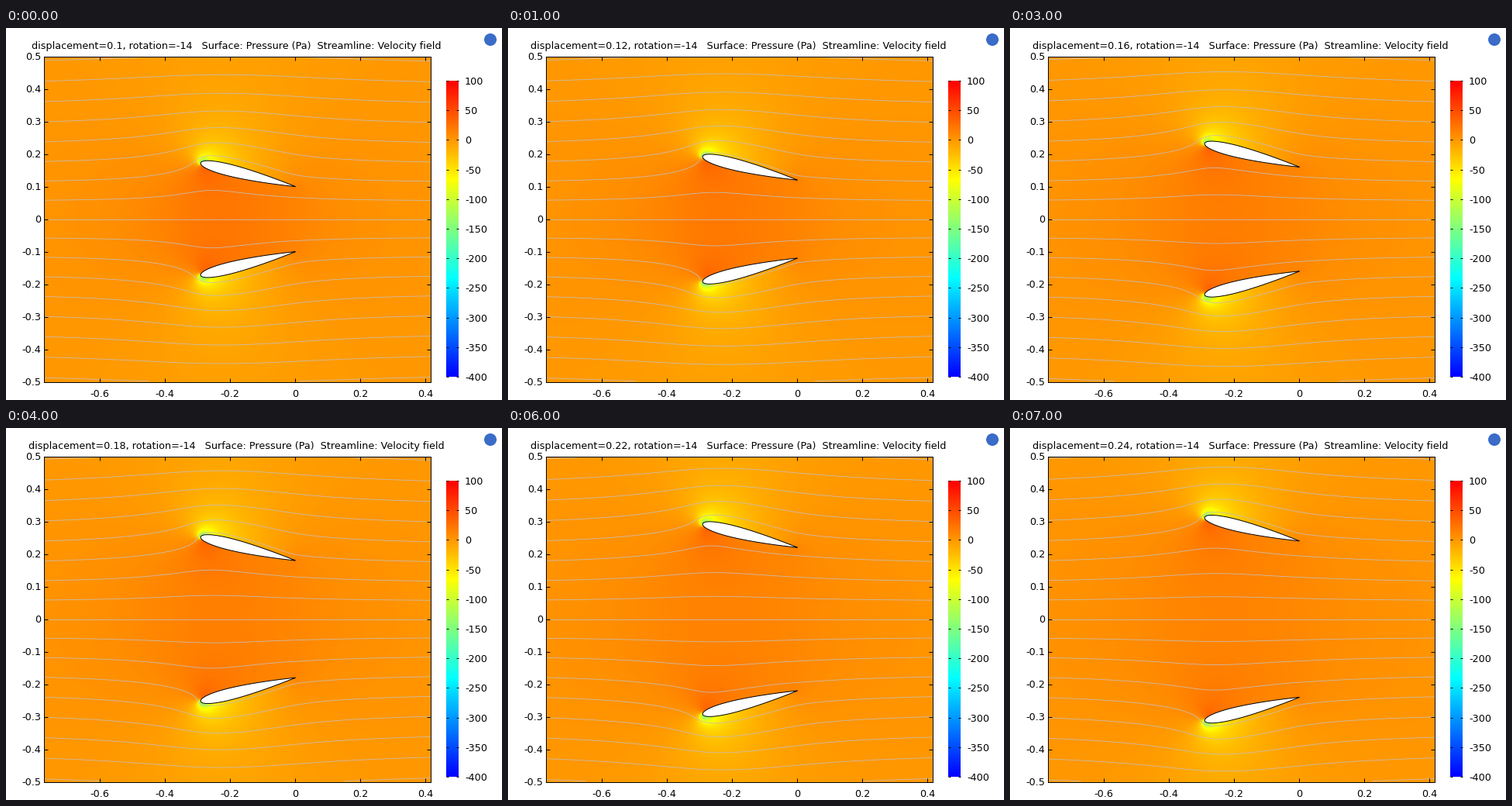
A matplotlib script for the animation above (8000 ms loop, 640x480 px).

```python
import numpy as np
import matplotlib.pyplot as plt
from matplotlib.animation import ArtistAnimation
from matplotlib.colors import LinearSegmentedColormap
from matplotlib.patches import Circle
from matplotlib.path import Path

W, H, DPI = 640, 480, 80
PX = 72 / DPI                      # one pixel in points
HAIR = 0.98 * PX                   # just under a pixel, snaps to one row
SCALE = 420                        # pixels per unit length
LEFT, TOP, RIGHT, BOTTOM = 49.4, 36.6, 548.4, 456.6
X0, Y0 = 373.4, 246.6              # pixel position of the plot's zero
XLIM = ((LEFT - X0) / SCALE, (RIGHT - X0) / SCALE)
YLIM = (-0.5, 0.5)

CHORD, ANGLE = 0.3, np.radians(14)
DYNAMIC_P = 34                     # free stream dynamic pressure, Pa
P_MIN, P_MAX = -400, 100
BAR_TOP, BAR_HEIGHT = 68, 382
DISPLACEMENTS = np.arange(0.10, 0.25, 0.02)

plt.rcParams["font.family"] = "DejaVu Sans"
plt.rcParams["font.size"] = 12.7 * PX
rainbow = LinearSegmentedColormap.from_list(
    "rainbow_bar", [(0, 0, 1), (0, 1, 1), (1, 1, 0), (1, 0, 0)], 1024)


# ---- potential flow around the mirrored pair of foils ----

def foil(d, n=32):
    """Closed symmetric foil, trailing edge at (0, d), nose turned up."""
    s = (1 + np.cos(np.linspace(0, np.pi, n + 1))) / 2
    t = 0.6 * (0.2969 * np.sqrt(s) - 0.126 * s - 0.3516 * s**2
               + 0.2843 * s**3 - 0.1036 * s**4)
    t[0] = 0
    shape = np.concatenate([s - 1 + 1j * t, (s - 1 - 1j * t)[-2::-1]])
    return 1j * d + CHORD * shape * np.exp(-1j * ANGLE)


def panel(z, a, b):
    """Stream function and velocity of a unit vortex sheet from a to b."""
    size = np.abs(b - a)
    tangent = (b - a) / size
    local = (z - a) / tangent
    x, y = local.real, local.imag
    x2 = x - size
    log1 = np.log(x * x + y * y + 1e-14)
    log2 = np.log(x2 * x2 + y * y + 1e-14)
    turn = np.arctan2(y * size, x * x2 + y * y)
    psi = -(x * log1 - x2 * log2 - 2 * size + 2 * y * turn) / (4 * np.pi)
    vel = tangent * (-2 * turn + 1j * (log1 - log2)) / (4 * np.pi)
    return psi, vel


def sheet_strengths(pts, body_psi):
    """Sheets for a given body stream value, and for smooth flow off the tail."""
    a, b = pts[:-1], pts[1:]
    mid = ((a + b) / 2)[:, None]
    A = panel(mid, a, b)[0] - panel(mid.conj(), a, b)[0]
    y = mid.imag[:, 0]
    n = len(y)
    fixed = np.linalg.solve(A, body_psi - y)
    M = np.zeros((n + 1, n + 1))
    M[:n, :n] = A
    M[:n, n] = -1
    M[n, 0] = M[n, n - 1] = 1
    smooth = np.linalg.solve(M, np.append(-y, 0))[:n]
    return fixed, smooth


def fill_hole(p, hole):
    """Carry outside values a few cells into the body."""
    for _ in range(3):
        known = (~hole).astype(float)
        total, count = 0, 0
        for step, axis in ((1, 0), (-1, 0), (1, 1), (-1, 1)):
            total = total + np.roll(known * p, step, axis)
            count = count + np.roll(known, step, axis)
        edge = hole & (count > 0)
        p[edge] = total[edge] / count[edge]
        hole = hole & ~edge
    return p


NX, NY = 300, 252
gx = XLIM[0] + (np.arange(NX) + 0.5) * (XLIM[1] - XLIM[0]) / NX
gy = YLIM[0] + (np.arange(NY) + 0.5) / NY
GX, GY = np.meshgrid(gx, gy)
GRID = GX + 1j * GY


def flow(d):
    pts = foil(d)
    fixed, smooth = sheet_strengths(pts, 0.907 * d - 0.0057)
    psi, vel = np.zeros(GRID.shape), np.zeros(GRID.shape, complex)
    for a, b, g, k in zip(pts[:-1], pts[1:], fixed, smooth):
        dpsi, dvel = panel(GRID, a, b)
        psi += g * dpsi
        vel += k * dvel
    psi = GY + psi - psi[::-1]
    vel = 1 + vel + vel[::-1].conj()
    p = np.maximum(DYNAMIC_P * (1 - np.abs(vel)**2), -125)
    outline = Path(np.column_stack([pts.real, pts.imag]))
    cells = np.column_stack([GX.ravel(), GY.ravel()])
    hole = outline.contains_points(cells).reshape(GRID.shape)
    return pts, psi, fill_hole(p, hole | hole[::-1])


# ---- fixed parts of the picture ----

fig = plt.figure(figsize=(W / DPI, H / DPI), dpi=DPI, facecolor="white")


def pixel_axes(x0, y0, x1, y1):
    return fig.add_axes([x0 / W, 1 - y1 / H, (x1 - x0) / W, (y1 - y0) / H])


def put(x, y, s, ha="center"):
    return fig.text(x / W, 1 - y / H, s, ha=ha, va="baseline", color="black")


ax = pixel_axes(LEFT, TOP, RIGHT, BOTTOM)
ax.set(xlim=XLIM, ylim=YLIM)
xticks = np.arange(-3, 3) / 5
yticks = np.arange(-5, 6) / 10
ax.set_xticks(xticks, [""] * len(xticks))
ax.set_yticks(yticks, [""] * len(yticks))
ax.tick_params(direction="in", length=5 * PX, width=HAIR, top=True, right=True)
for side in ax.spines.values():
    side.set_linewidth(HAIR)
for v in xticks:
    put(X0 + v * SCALE - 0.5, 475.5, f"{v:g}")
for v in yticks:
    put(45, Y0 - v * SCALE + 4.4, f"{v:g}", "right")

bar = pixel_axes(568, BAR_TOP, 584, BAR_TOP + BAR_HEIGHT)
bar.imshow(np.linspace(0, 1, 512)[:, None], cmap=rainbow, origin="lower",
           aspect="auto", extent=(0, 1, P_MIN, P_MAX))
pticks = np.arange(P_MIN, P_MAX + 1, 50)
bar.set_xticks([])
bar.set_yticks(pticks, [""] * len(pticks))
bar.tick_params(direction="in", length=3 * PX, width=HAIR, right=True)
for side in bar.spines.values():
    side.set_visible(False)
for v in pticks:
    y = BAR_TOP + (P_MAX - v) * BAR_HEIGHT / (P_MAX - P_MIN)
    put(592, y + 5, f"{v}", "left")

fig.add_artist(Circle((625, H - 15), 8, transform=None, color="#3a6cc8", lw=0))


# ---- one set of artists per displacement ----

k = np.arange(-8, 9)
LEVELS = 0.0552 * k + 0.00053 * k * np.abs(k)


def scene(d):
    pts, psi, p = flow(d)
    field = ax.imshow(p, cmap=rainbow, vmin=P_MIN, vmax=P_MAX, origin="lower",
                      extent=(*XLIM, *YLIM), aspect="auto",
                      interpolation="bilinear", zorder=0)
    lines = ax.contour(gx, gy, psi, levels=LEVELS, colors="#c8beb4",
                       linewidths=0.8 * PX, linestyles="solid",
                       antialiased=True, zorder=1)
    foils = [ax.fill(pts.real, sign * pts.imag, fc="white", ec="black",
                     lw=HAIR, zorder=2)[0] for sign in (1, -1)]
    title = put(297, 27, f"displacement={d:.2g}, rotation=-14   "
                "Surface: Pressure (Pa)  Streamline: Velocity field")
    return [field, lines, *foils, title]


scenes = [scene(d) for d in DISPLACEMENTS]
ax.set(xlim=XLIM, ylim=YLIM)
anim = ArtistAnimation(fig, scenes, interval=1000, repeat=True,
                       repeat_delay=0, blit=False)
plt.show()
```
